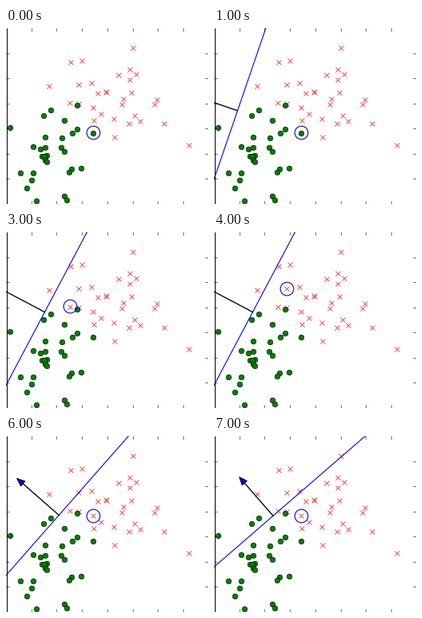
A matplotlib script for the animation above (8000 ms loop, 253x221 px).

```python
import numpy as np
import matplotlib.pyplot as plt
from matplotlib.animation import FuncAnimation

W, H, DPI = 253, 221, 80

CROSSES = np.array([
    (159, 24), (81, 42), (95, 40), (155, 51), (163, 57), (141, 58),
    (155, 64), (54, 72), (91, 70), (107, 68), (115, 81), (125, 79),
    (126, 80), (157, 80), (147, 88), (189, 89), (186, 95), (145, 95),
    (80, 93), (91, 94), (109, 99), (119, 107), (161, 109), (135, 113),
    (110, 115), (168, 116), (154, 119), (198, 119), (136, 136), (229, 146)])

DOTS = np.array([
    (5, 124), (56, 102), (47, 109), (89, 96), (73, 115), (89, 126),
    (83, 131), (109, 131), (49, 136), (70, 137), (34, 148), (43, 151),
    (49, 149), (69, 149), (73, 154), (45, 160), (51, 159), (48, 160),
    (49, 165), (51, 167), (18, 181), (34, 181), (82, 176), (94, 175),
    (79, 180), (32, 190), (26, 200), (38, 216), (73, 210), (76, 215)])

# Misclassified sample of each perceptron round
PICKS = [(109, 130), (80, 92), (91, 70), (109, 99)]

# Boundary after each round: top intercept, left intercept, arrow foot x
BOUNDARIES = [(65, 190, 29.5), (101.5, 192.5, 48.5),
              (153.5, 175, 66.3), (189.5, 164.5, 74)]
ARROW, HEAD, HEAD_HALF = 70, 10, 4
# The first two weight vectors run out of view
LENGTHS = [ARROW, ARROW, ARROW, 64.5]

fig = plt.figure(figsize=(W / DPI, H / DPI), dpi=DPI, facecolor="white")
ax = fig.add_axes([0, 0, 1, 1])
ax.set_xlim(0, W)
ax.set_ylim(H, 0)
ax.axis("off")


def segment(x, y, width):
    ax.plot(x, y, color="black", lw=width, zorder=4,
            solid_capstyle="butt")


segment([0.5, 0.5], [0, H], 0.9)
for x in np.arange(1, 8) * 31.75:
    segment([x, x], [0, 4], 0.5)
    segment([x, x], [H - 4, H], 0.5)
for y in np.arange(1, 7) * 31.55:
    segment([0, 4], [y, y], 0.5)
    segment([W - 4, W], [y, y], 0.5)

ax.plot(*(CROSSES + 0.5).T, "x", color="red", ms=6, mew=0.6, zorder=2)
ax.plot(*(DOTS + 0.5).T, "o", mfc="green", mec="black", ms=6, mew=0.5,
        zorder=2.1)

line, = ax.plot([], [], color="blue", lw=1, zorder=2.2)
shaft, = ax.plot([], [], color="black", lw=1.2, zorder=2.3)
head, = ax.fill([0, 0, 0], [0, 0, 0], fc="blue", ec="black", lw=0.9,
                joinstyle="miter", zorder=2.4)
ring, = ax.plot([], [], "o", mfc="none", mec="blue", ms=15, mew=1,
                zorder=2.5)


def show_boundary(k):
    top, left, foot_x = BOUNDARIES[k]
    line.set_data([top, 0], [0, left])
    foot = np.array([foot_x, left * (1 - foot_x / top)])
    normal = -np.array([left, top]) / np.hypot(left, top)
    side = np.array([-normal[1], normal[0]]) * HEAD_HALF
    tip = foot + normal * LENGTHS[k]
    base = tip - normal * HEAD
    shaft.set_data(*np.array([foot, base]).T)
    head.set_xy([tip, base + side, base - side])


def update(step):
    """Even steps pick a sample, odd steps move the boundary."""
    x, y = PICKS[step // 2]
    ring.set_data([x + 0.5], [y + 0.5])
    k = (step + 1) // 2 - 1
    for part in (line, shaft, head):
        part.set_visible(k >= 0)
    if k >= 0:
        show_boundary(k)
    return line, shaft, head, ring


anim = FuncAnimation(fig, update, frames=8, interval=1000, repeat=True,
                     repeat_delay=0, blit=False)
plt.show()
```
